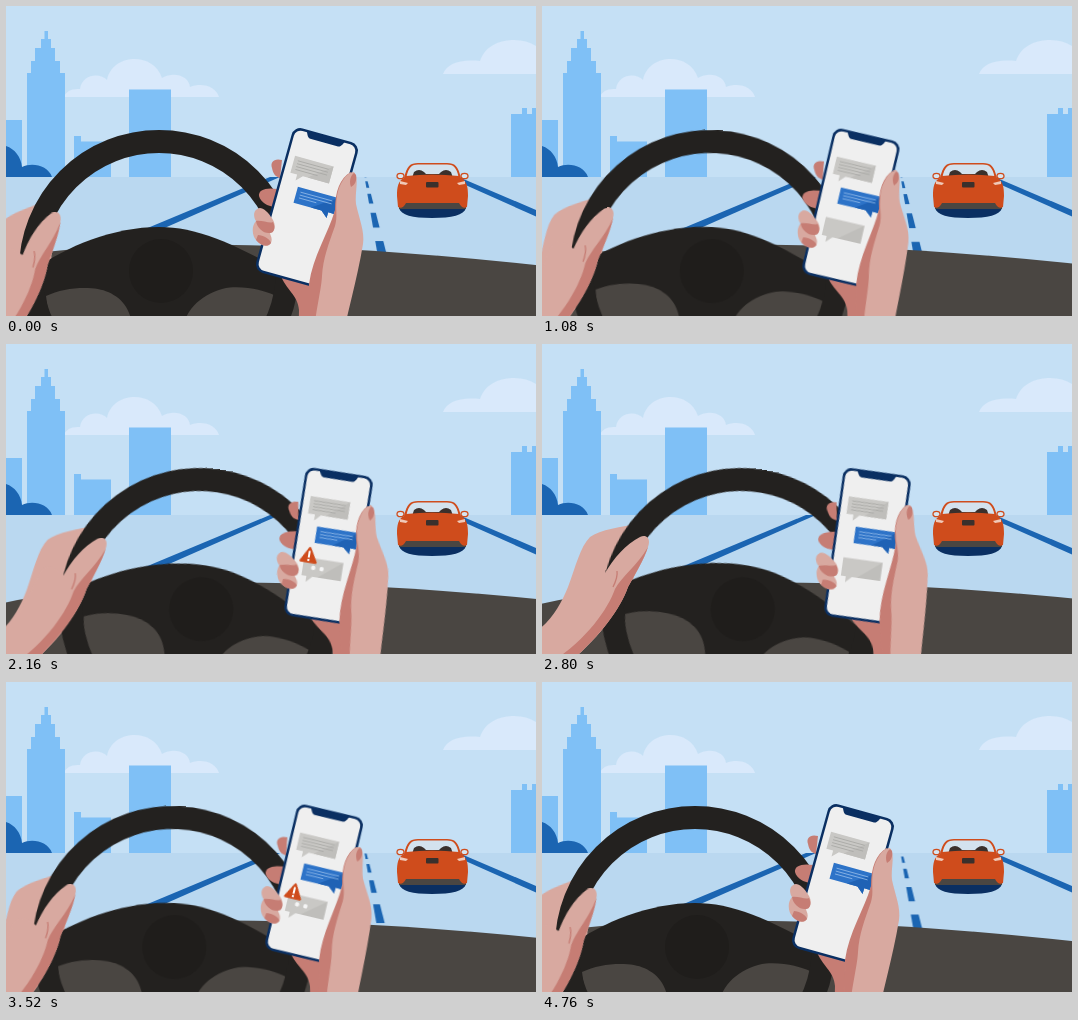
Animation of 530 by 310 pixels, one loop 4.8 s. Source, as an HTML page:

```html
<!DOCTYPE html>
<html lang="en">
<head>
<meta charset="utf-8">
<title>Eyes on the road</title>
<style>
  html, body { margin: 0; width: 100%; height: 100%; overflow: hidden; background: #c5e0f5; }
  svg { display: block; width: 530px; height: 310px; }

  .sway { animation: 4800ms infinite; }
  .dash { animation-name: slide; }
  .wheel { animation-name: steer; transform-origin: 153px 264px; }
  .left { animation-name: grip; transform-origin: 107px 195px; }
  .right { animation-name: tilt; transform-origin: 287.5px 120px; }
  .lane { animation: approach calc(4800ms / 9) cubic-bezier(.333, .27, .667, .595) infinite; transform-origin: 355px 150px; }
  .reply { animation: reply 4800ms step-end infinite; }
  .alert { animation: alert 4800ms step-end infinite; }
  .dot { opacity: 0; animation: 1600ms step-end infinite; }
  .d1 { animation-name: dot1; }
  .d2 { animation-name: dot2; }
  .d3 { animation-name: dot3; }

  /* slow drift to the right, quick correction back; the dashboard returns more slowly */
  @keyframes slide {
    0% { transform: translate(0, 0); animation-timing-function: cubic-bezier(.37, 0, .63, 1); }
    58.33% { transform: translate(46px, 0); animation-timing-function: cubic-bezier(.37, 0, .63, 1); }
    100% { transform: translate(0, 0); }
  }
  @keyframes steer {
    0% { transform: translate(0, 0) rotate(0deg); animation-timing-function: cubic-bezier(.37, 0, .63, 1); }
    58.33% { transform: translate(46px, 0) rotate(10deg); animation-timing-function: cubic-bezier(.2, 0, .1, 1); }
    100% { transform: translate(0, 0) rotate(0deg); }
  }
  @keyframes grip {
    0% { transform: translate(-53px, 13px) rotate(-10deg); animation-timing-function: cubic-bezier(.37, 0, .63, 1); }
    58.33% { transform: translate(0, 0) rotate(0deg); animation-timing-function: cubic-bezier(.2, 0, .1, 1); }
    100% { transform: translate(-53px, 13px) rotate(-10deg); }
  }
  @keyframes tilt {
    0% { transform: translate(0, 0) rotate(0deg); animation-timing-function: cubic-bezier(.37, 0, .63, 1); }
    58.33% { transform: translate(14px, 3px) rotate(-7.5deg); animation-timing-function: cubic-bezier(.2, 0, .1, 1); }
    100% { transform: translate(0, 0) rotate(0deg); }
  }
  @keyframes approach { from { transform: scale(1); } to { transform: scale(1.5); } }
  @keyframes reply { 0% { opacity: 0; } 8.33% { opacity: 1; } 93.33% { opacity: 0; } }
  @keyframes alert {
    0% { opacity: 0; } 26.67% { opacity: 1; } 51.67% { opacity: 0; }
    65% { opacity: 1; } 90% { opacity: 0; }
  }
  @keyframes dot1 { 0% { opacity: 0; } 10% { opacity: 1; } 65% { opacity: 0; } }
  @keyframes dot2 { 0% { opacity: 0; } 18% { opacity: 1; } 65% { opacity: 0; } }
  @keyframes dot3 { 0% { opacity: 0; } 46% { opacity: 1; } 65% { opacity: 0; } }

  .skin { fill: #d8a9a0; }
  .shade { fill: #c67d74; }
  .blue { fill: #1b65b2; }
  .navy { fill: #0a2f62; }
  .black { fill: #23211f; }
  .trim { fill: #4a4642; }
  .orange { fill: #cf4c1c; }
  .city { fill: #7fc0f6; }
  .cloud { fill: #d9e9fb; }
</style>
</head>
<body>
<svg viewBox="0 0 530 310">
  <defs>
    <clipPath id="road"><rect y="171" width="530" height="139"/></clipPath>
    <clipPath id="rim"><circle cx="153" cy="264" r="130"/></clipPath>
    <clipPath id="screen"><rect x="2.5" y="2.5" width="64" height="145" rx="7"/></clipPath>
    <path id="streak" d="M14.2 85 L22.2 85 L27.8 107 L18 107 Z"/>
  </defs>

  <!-- sky and city -->
  <rect width="530" height="310" fill="#c5e0f5"/>
  <g class="cloud">
    <path d="M58 91 Q61 82 74 83 C76 68 94 66 101 74 C106 48 147 45 156 72 C168 65 183 70 184 81 C197 76 210 81 213 91 Z"/>
    <path d="M437 68 C441 58 453 53 474 55 C480 38 496 34 508 34 Q521 34 530 40 V68 Z"/>
  </g>
  <rect y="171" width="530" height="139" fill="#bad8f0"/>
  <g class="city">
    <path d="M21 171 V67 H25 V55 H29 V42 H35 V33 H38.5 V25 H42 V33 H45 V42 H49 V55 H54 V67 H59 V171 Z"/>
    <path d="M0 114 H16 V171 H0 Z M68 171 V130 H75 V135.500 H105 V171 Z M123 83.500 H165 V171 H123 Z"/>
    <path d="M505 171 V108 H516 V102 H521 V108 H526 V102 H530 V171 Z"/>
  </g>
  <path class="blue" d="M0 140 C9 143 15 151 16 161 C27 156 42 160 46 171 H0 Z"/>

  <!-- road markings -->
  <g class="blue" clip-path="url(#road)">
    <path d="M264 171 H274 L120 239 V231 Z"/>
    <path d="M455 172 L530 204 V210.500 L455 177 Z"/>
    <g class="lane">
      <g transform="translate(355 150)">
        <use href="#streak"/>
        <use href="#streak" transform="scale(.6667)"/>
        <use href="#streak" transform="scale(.4444)"/>
        <use href="#streak" transform="scale(.2963)"/>
        <use href="#streak" transform="scale(.1975)"/>
        <use href="#streak" transform="scale(.1317)"/>
      </g>
    </g>
  </g>

  <!-- car ahead -->
  <g>
    <path class="navy" d="M393 202 H460 C458 209 446 212 426 212 C406 212 395 209 393 202 Z"/>
    <path class="trim" d="M393 195 H460 V203 H393 Z"/>
    <path class="orange" d="M398 172 C401 160 404 157 412 157 H441 C449 157 452 160 455 172 C461 175 462 181 462 190 L461 201 C458 203 455 201 453 197 H400 C398 201 395 203 392 201 L391 190 C391 181 392 175 398 172 Z"/>
    <path fill="#d3e2ee" d="M400.500 171 C402.500 161 406 158.500 412 158.500 H441 C447 158.500 450.500 161 452.500 171 Z"/>
    <path fill="#3a302c" d="M406 172 L408 166 Q413 162 418 166 L420 168 H433 L435 166 Q440 162 445 166 L447 172 Z"/>
    <path class="orange" d="M400 170 Q426 167 453 170 V174 H400 Z"/>
    <g fill="#d8e5f0" stroke="#cf4c1c" stroke-width="1.3">
      <ellipse cx="394.5" cy="170" rx="3.5" ry="2.7"/>
      <ellipse cx="458.5" cy="170" rx="3.5" ry="2.7"/>
    </g>
    <path fill="#f0c9b8" d="M394 175 L402 177 L400 179 L394 178 Z M459 175 L451 177 L453 179 L459 178 Z"/>
    <rect x="420" y="176" width="12.5" height="5.5" rx="1" fill="#3a302c"/>
  </g>

  <!-- cabin -->
  <path class="trim sway dash" d="M-80 268 Q20 240 170 238.5 Q350 237 600 267 V330 H-80 Z"/>
  <path class="skin sway left" d="M-40 320 L0 283 C12 272 20 258 26 243 C34 222 38 203 48 193 C58 186 80 182 97 180 L104 186 L90 240 C78 265 60 290 28 318 L-20 360 Z"/>
  <g class="sway wheel">
    <g clip-path="url(#rim)">
      <path class="black" d="M28 264 C60 240 108 221 153 221 C190 221 225 236 282 268 V400 H28 Z"/>
      <path class="trim" d="M40 290 C60 280 90 280 102 286 C118 293 126 305 128 330 V400 H60 C50 340 43 312 40 290 Z"/>
      <path class="trim" d="M178 400 V320 C180 300 203 284 224 281.500 C245 280.500 258 285 268 289 C262 320 250 345 240 400 Z"/>
    </g>
    <circle cx="155" cy="265" r="32" fill="#1f1d1b"/>
    <circle cx="153" cy="264" r="128.5" fill="none" stroke="#23211f" stroke-width="23"/>
  </g>
  <g class="sway left">
    <path class="skin" d="M63 229 C72 214 84 200 98 193 C105 190 109 195 106 203 C102 216 92 232 86 243 C78 265 60 290 28 318 L-20 360 L-40 320 L0 283 C20 270 30 245 40 225 C48 215 56 222 63 229 Z"/>
    <path class="shade" d="M106 203 C102 216 92 232 86 243 C78 265 60 290 28 318 L-20 360 L-26 348 L10 318 C45 295 66 265 73 245 C80 232 95 222 106 203 Z"/>
    <path d="M71 243 Q76 233 75 227" fill="none" stroke="#c67d74" stroke-width="1.3"/>
  </g>

  <!-- hand with phone -->
  <g class="sway right">
    <path class="shade" d="M274 268 C280 284 292 289 293 304 L292 350 H335 L330 262 Z"/>
    <path class="shade" d="M276 154 C268 152 264 156 266 162 C267 168 270 171 274 172 Z"/>
    <path class="shade" d="M271 183 C260 181 252 184 253 190 C255 197 262 200 268 201 Z"/>
    <g transform="translate(288 120) rotate(15.5)">
      <rect class="navy" width="68.500" height="150" rx="9"/>
      <rect x="2.5" y="2.5" width="63.500" height="145" rx="7" fill="#efefef"/>
      <path class="navy" d="M13 1 H54 C52 2 52 8 47 8 H20 C15 8 15 2 13 1 Z"/>
      <g clip-path="url(#screen)">
        <path fill="#c9c8c5" d="M9 28.5 H49 V46 H22 L16 52 V46 H9 Z"/>
        <path fill="#bfbebb" d="M49 28.5 V46 H27 Z"/>
        <path d="M13 32.5 H45 M13 35.5 H45 M13 38.5 H45 M13 41.500 H36" stroke="#a9a8a5" stroke-width=".8"/>
        <path fill="#2d73c8" d="M20 57.500 H62 V74 H56 V80 L49 74 H20 Z"/>
        <path fill="#1f62b5" d="M62 57.500 V74 H56 V80 L49 74 H38 Z"/>
        <path d="M24 62 H57 M24 65 H57 M24 68 H42" stroke="#8fb9e8" stroke-width=".8"/>
        <g class="reply">
          <path fill="#c9c8c5" d="M12 89.500 H51.500 V108 H23 L17 114 V108 H12 Z"/>
          <path fill="#bfbebb" d="M51.500 89.500 V108 H28 Z"/>
          <g fill="#f5f5f5">
            <circle class="dot d1" cx="22.500" cy="99" r="2.200"/>
            <circle class="dot d2" cx="31" cy="99" r="2.200"/>
            <circle class="dot d3" cx="39.500" cy="99" r="2.200"/>
          </g>
        </g>
      </g>
      <g class="alert" transform="translate(-.5 2)">
        <path d="M17 78 L24.500 91.500 H9.500 Z" fill="#cf4c1c" stroke="#cf4c1c" stroke-width="2.500" stroke-linejoin="round"/>
        <path d="M17 81.500 V86.800" stroke="#fff" stroke-width="2" stroke-linecap="round"/>
        <circle cx="17" cy="90" r="1.150" fill="#fff"/>
      </g>
    </g>
    <path class="skin" d="M254 202 C247 203 247 211 250 215 C245 220 246 231 251 235 C255 240 262 242 265 237 C267 232 264 229 264 227 C269 226 270 219 267 214 C264 209 260 203 254 202 Z"/>
    <path class="shade" d="M250 215 C256 214 264 218 267 216 C270 222 268 227 264 227 C258 228 251 222 250 215 Z M252 229 C257 229 264 233 265 237 C261 242 254 239 250 234 Z"/>
    <path class="shade" d="M345 166 C334 172 329 185 329 204 C322 228 307 250 303 278 C302 292 301 320 301 350 H335 L348 230 Z"/>
    <path class="skin" d="M347 166 C340 167 333 178 331 190 C329 203 332 210 329 220 C323 237 317 252 316 270 C315 288 308 308 306 350 H333 C340 310 351 275 357 238 C359 226 353 212 350 198 C349 187 352 177 350 170 Q349 166 347 166 Z"/>
    <path class="shade" d="M348 167 C344 170 343 176 345 181 C349 179 351 174 350 169 Z"/>
  </g>
</svg>
</body>
</html>
```
